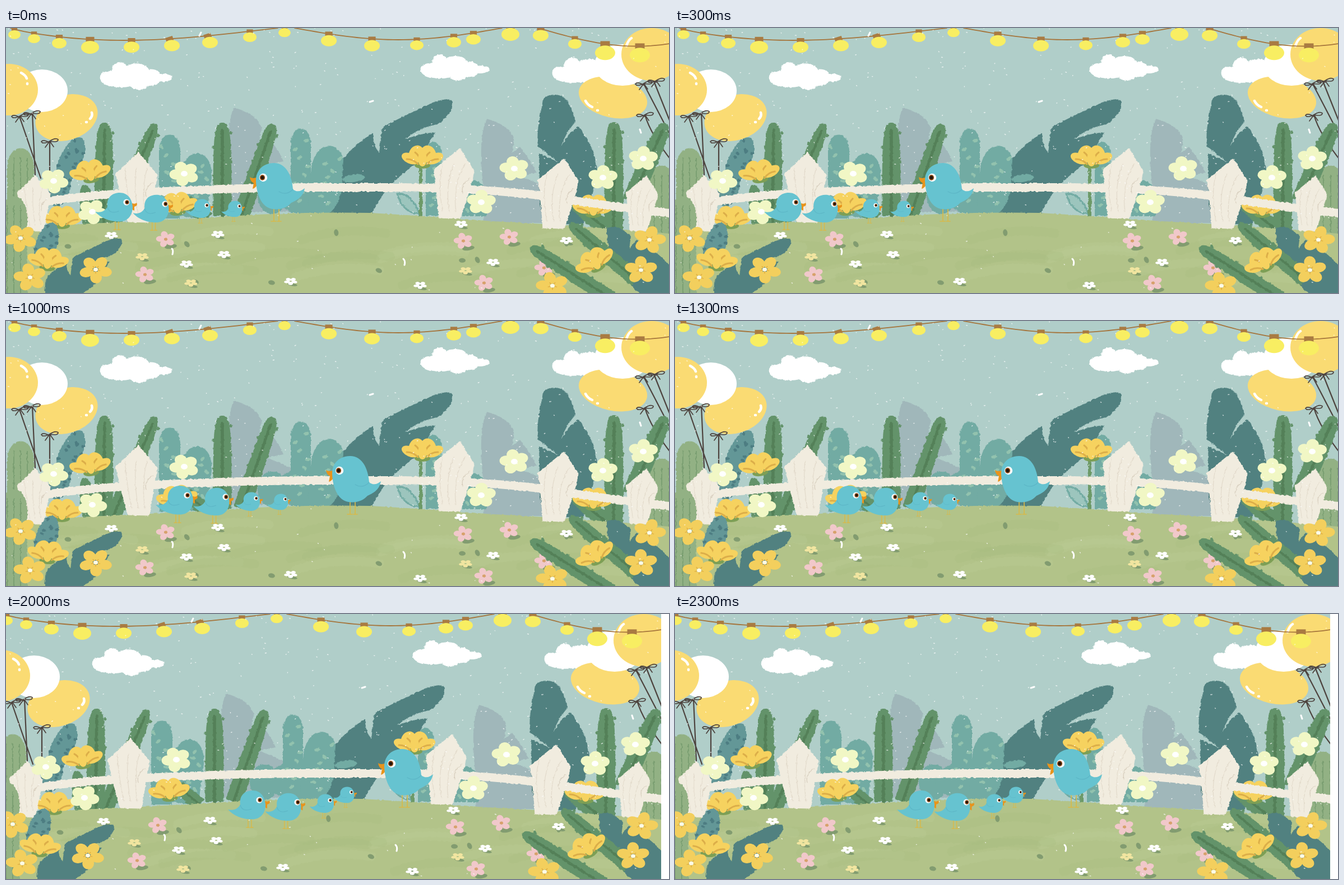
Write an HTML page that moves like this. It is 1183 px wide and 473 px high and loops after 2.5 s.

```html
<!DOCTYPE html>
<html lang="en">
<head>
<meta charset="utf-8">
<title>Birds in the garden</title>
<style>
html, body { margin: 0; width: 100%; height: 100%; overflow: hidden; background: #fff; }
body > svg { display: block; width: 100vw; height: 100vh; }
</style>
</head>
<body>
<script>
const W = 1183, H = 473;
let seed = 7;
const rand = (lo = 0, hi = 1) => lo + (hi - lo) * (seed = (seed * 16807) % 2147483647) / 2147483647;

const path = (d, fill, extra = '') => `<path d="${d}" fill="${fill}" ${extra}/>`;
const line = (d, color, w, extra = '') =>
  `<path d="${d}" fill="none" stroke="${color}" stroke-width="${w}" stroke-linecap="round" ${extra}/>`;
const oval = (x, y, rx, ry, fill, rot = 0) =>
  `<ellipse cx="${x}" cy="${y}" rx="${rx}" ry="${ry}" fill="${fill}" transform="rotate(${rot} ${x} ${y})"/>`;
const move = (s, transform) => `<g transform="${transform}">${s}</g>`;
const rough = s => `<g filter="url(#rough)">${s}</g>`;
const repeat = (n, fn) => Array.from({ length: n }, (_, i) => fn(i)).join('');
const each = (list, fn) => list.map(a => fn(...a)).join('');

// ---------- plants ----------
const GREEN = '#63936a', DARK = '#518180', TEAL = '#72aba3', GREY = '#a0b7ba', PALE = '#92b184';

// Tapered leaf from its tip to its foot
function stalk(x1, y1, x2, y2, w) {
  const len = Math.hypot(x2 - x1, y2 - y1), h = w / 2;
  const s = path(`M0 0C0 ${-h} 30 ${-h} ${len} ${-h}V${h}C30 ${h} 0 ${h} 0 0Z`, GREEN) +
    line(`M14 0H${len}`, '#548058', w / 6) +
    repeat(Math.floor(len / 26), i => oval(18 + i * 26, (i % 2 ? h : -h) * .92, 3, 2.5, GREEN));
  return move(s, `translate(${x1} ${y1}) rotate(${Math.atan2(y2 - y1, x2 - x1) * 180 / Math.PI})`);
}

function cactus(x, top, bottom, rx, color, rot = 0) {
  const dome = `M${x - rx} ${bottom}V${top + rx * 1.6}C${x - rx} ${top - rx * .5} ${x + rx} ${top - rx * .5} ${x + rx} ${top + rx * 1.6}V${bottom}Z`;
  const marks = color === PALE
    ? repeat(3, i => line(`M${x + (i - 1) * rx / 2} ${top + 18}V${bottom}`, '#7b9f72', 2))
    : repeat(8, i => oval(x + rand(-.8, .8) * rx, top + 22 + i * (bottom - top - 28) / 8, 5, 2.8, '#92c2ae', rand(-60, 60)));
  return move(path(dome, color) + marks, `rotate(${rot} ${x} ${bottom})`);
}

const spotted = (x, y, rx, ry, rot) => move(
  oval(0, 0, rx, ry, '#639797') + repeat(14, i => {
    const a = i * 2.4, k = i % 2 ? .9 : .5;
    return oval(Math.cos(a) * rx * k, Math.sin(a) * ry * k, 3.5, 2.5, '#4d7d82', a * 57);
  }), `translate(${x} ${y}) rotate(${rot})`);

const greyLeaf = path('M406 142C430 148 450 160 456 178L452 203 466 192C480 210 490 225 495 238L466 244 508 262V328H400C408 270 385 200 406 142Z', GREY);
const bigLeaf = path('M797 134C797 120 765 130 742 142C715 156 692 165 671 178L666 222Q655 212 655 187C635 200 614 216 602 234L600 268Q600 310 578 330H654C672 290 700 264 735 240L766 186Q738 188 712 199Q735 178 769 172C785 163 797 148 797 134Z', DARK);
const tallLeaf = path('M958 128C970 114 992 118 1000 128C1010 145 1018 160 1014 170Q1000 185 990 212Q1004 186 1022 176C1040 200 1058 235 1055 268L1030 350H960C945 290 953 260 951 224L985 239 949 211C946 180 955 150 958 128Z', DARK);

const backPlants = greyLeaf + move(greyLeaf, 'translate(451 20)') + tallLeaf +
  cactus(26, 214, 375, 24, PALE) + cactus(1170, 245, 370, 26, PALE) +
  spotted(115, 238, 20, 46, 24) + spotted(97, 285, 17, 35, 15) +
  stalk(267, 171, 190, 352, 27) + stalk(176, 169, 174, 352, 33) + stalk(140, 280, 150, 352, 26) +
  cactus(292, 190, 340, 19, TEAL) + cactus(328, 222, 338, 29, TEAL, 8) +
  stalk(310, 300, 360, 340, 24) + stalk(386, 169, 386, 335, 33) + stalk(477, 171, 420, 335, 29) +
  oval(475, 300, 26, 32, TEAL) + oval(540, 298, 62, 34, TEAL) +
  cactus(526, 179, 330, 18, TEAL) + cactus(568, 209, 330, 30, TEAL, 5) + cactus(763, 203, 335, 14, TEAL) +
  path('M698 296Q722 292 738 332Q708 330 698 296Z', '#9cc5bd', `stroke="${TEAL}" stroke-width="3"`) +
  bigLeaf + oval(620, 268, 20, 7, TEAL, -8) + line('M740 245V334', '#6d9a68', 6) +
  stalk(1177, 170, 1115, 310, 32) + stalk(1085, 168, 1084, 362, 34) + stalk(1010, 310, 1070, 358, 28) +
  cactus(836, 272, 336, 22, TEAL);

const frontPlants = cactus(14, 300, H + 10, 24, PALE) +
  move(bigLeaf, 'translate(-351 286) scale(.7)') + spotted(72, 386, 19, 40, 18) +
  path('M1072 358C1085 350 1105 360 1115 372L1112 394 1125 378C1150 390 1193 425 1193 440V483H1140C1100 450 1070 400 1072 358Z', DARK) +
  stalk(1006, 349, 1125, 450, 27) + stalk(936, 391, 1080, 483, 27);

// ---------- flowers ----------
const bloom = (x, y, r, color, rot, core, fat = .36, flat = .84) => move(
  repeat(5, i => `<ellipse cx="${r * .58}" rx="${r * .44}" ry="${r * fat}" fill="${color}" transform="rotate(${i * 72 + rot})"/>`) + core,
  `translate(${x} ${y}) scale(1 ${flat})`);

const rays = repeat(5, i => line('M0 0H8', '#e2ae43', 1.6, `transform="rotate(${i * 72 + 18})"`));
const yellow = (x, y) => bloom(x, y, 29, '#f3cf5d', x % 72, rays + oval(0, 0, 4, 4, '#fffbe6'));
const cream = (x, y) => bloom(x, y, 26, '#f1f7c5', x % 72, oval(0, 0, 6, 6, '#fff'), .42);

function cup(x, y, rot = 0) {
  const side = oval(-22, 3, 16, 9, '#f6d25f', 24) + oval(-11, -5, 13, 16, '#f6d25f', 24) +
    line('M-28 4Q-16 4-8 13M-13-8Q-6-3-4 7', '#dcae49', 3);
  return move(oval(0, 15, 14, 6, '#7d9f55') + side + move(side, 'scale(-1 1)') + oval(0, 4, 8, 13, '#f6d25f'),
    `translate(${x} ${y}) rotate(${rot})`);
}

const LEAF = '#829c70';
const pink = (x, y) => oval(x + 9, y + 13, 11, 4, LEAF, -8) + line(`M${x} ${y}l3 14`, LEAF, 2) +
  bloom(x, y, 17, '#f1c8ca', 40, oval(0, 0, 3, 3, '#d9a06b'));
const small = color => (x, y) => oval(x + 3, y + 6, 9, 2.5, LEAF, 10) + bloom(x, y, 12, color, 20, '', .36, .55);

const meadow = repeat(14, () => oval(rand(100, 1100), rand(365, 465), 6, 4, LEAF, rand(0, 90))) +
  each([[285, 377], [248, 440], [816, 380], [898, 373], [853, 455], [960, 428]], pink) +
  each([[188, 370], [378, 368], [322, 421], [508, 452], [389, 404], [812, 350], [1000, 379], [869, 418], [739, 459]], small('#fff')) +
  each([[243, 408], [330, 455], [820, 433]], small('#f1e5a0'));

// ---------- fence ----------
// lean: 0 for an upright post, 1 for one whose foot slants to the left
function post(x, y, size, lean) {
  const left = -40 - 7 * lean, right = 34 - 9 * lean, foot = -19 - 19 * lean;
  const s = path(`M0 0L${right} 40Q${right - 3} 62 ${foot + 38} 125L${foot} 124Q${left + 5} 62 ${left} 38Z`,
    '#f1ecdf', 'stroke="#f1ecdf" stroke-linejoin="round"') +
    repeat(3, i => line(`M${left + 16 + i * 20} 28Q${foot + i * 13 - 2} 65 ${foot + 7 + i * 12} 112`, '#e2dacb', 1.2)) +
    line(`M${right - 8} 54q-16 10-12 25`, '#d8cfbf', 1.3);
  return move(s, `translate(${x} ${y}) scale(${size})`);
}

const fence = line('M-8 324Q90 303 200 296Q400 285 550 284.5H700Q850 286 955 299Q1060 316 1195 332', '#f1ecdf', 15) +
  each([[52, 263, .8, 0], [236, 222, 1, 0], [810, 215, 1, 1], [996, 233, 1, 1], [1143, 264, .79, 1]], post);

// ---------- sky ----------
const cloud = path('M2 36C-4 22 12 18 22 19C20 4 40-4 49 10C60 2 82 4 88 16C98 14 108 20 107 24C120 22 134 27 129 32C124 38 112 39 107 38C104 46 90 44 86 46C78 54 62 54 55 46C40 50 8 48 2 36Z', '#fff');
const clouds = each([[167, 58, 1, 1], [739, 45, .96, .94], [974, 50, 1, 1]],
  (x, y, sx, sy) => move(cloud, `translate(${x} ${y}) scale(${sx} ${sy})`));

const CORD = '#4d433e', GOLD = '#fadb73';
const bow = (x, y) => line(`M${x} ${y}q-12-7-15-2 3 5 15-1 10-7 15-3 0 6-15 3l-8 11m8-11l7 10`, CORD, 1.7);
const balloons = line('M24 158L62 268M47 152L52 262M78 204V266M1138 100L1190 200M1156 95L1190 180M1140 155Q1150 190 1190 240', CORD, 2.2) +
  oval(108, 160, 57, 40, GOLD, -18) + oval(64, 112, 46, 38, '#fff') + oval(5, 110, 52, 46, GOLD) +
  oval(1083, 124, 62, 36, GOLD, 12) + oval(1100, 66, 50, 37, '#fff') + oval(1152, 47, 54, 47, GOLD) +
  line('M27 80Q35 84 37 90M153 151Q155 157 150 162M1034 130Q1038 138 1046 141M1107 32Q1110 22 1116 18M38 99v1M143 168h1M1055 147h1', '#fff', 4.5) +
  each([[25, 160], [46, 155], [78, 205], [1138, 102], [1160, 97], [1140, 158]], bow);

// Garlands: start, end, depth and skew of each hanging cord
const cords = [[8, 485, 22, .81], [515, 885, 21, 1], [950, 1300, 32.5, 1]];
const sag = x => {
  const [a, b, depth, skew] = cords.find(c => x < c[1] + 20);
  return depth * Math.sin(Math.PI * Math.max(0, (x - a) / (b - a)) ** skew);
};
const cordLines = each(cords, (a, b) =>
  line('M' + Array.from({ length: 41 }, (_, i) => a + (b - a) * i / 40).map(x => `${x} ${sag(x)}`).join('L'), '#a5753c', 1.8));

function bulb(x, r) {
  const y = sag(x), tilt = x > 280 && x < 380 ? -18 : 0;
  return `<rect x="${x - r * .47}" y="${y - r * .28}" width="${r * .94}" height="${r * .7}" fill="#a97b42" transform="rotate(${tilt} ${x} ${y + r})"/>` +
    oval(x, y + r * .88, r, r * .72, '#f8ee62');
}
const lights = cordLines + each([[15, 11], [50, 11], [95, 13], [150, 16], [224, 14], [296, 14], [364, 14], [435, 12], [497, 11],
  [576, 14], [653, 14], [733, 12], [799, 13], [834, 13], [900, 16], [954, 14], [1015, 12], [1069, 18], [1131, 18]], bulb);

const dots = (n, bottom) => repeat(n, () => `M${rand(0, W)} ${rand(0, bottom)}l${rand(-1, 2)} ${rand(-1, 1)}`);
const specks = line(dots(330, 340) + dots(80, H), '#fff', 1.4, 'opacity=".75"') +
  line('M649 132l6-2M296 394q3 2 1 10M709 412q4 4 2 11M1131 181l2 6M348 8l-3 6', '#fff', 3);

// ---------- ground ----------
const ground = path('M-10 363Q100 350 217 346Q340 340 430 334Q540 328 650 330Q770 337 870 345Q1050 354 1193 368V483H-10Z', '#b2c389') +
  repeat(22, i => line(`M${rand(0, 1100)} ${rand(375, 465)}q70-24 150-12`, i % 2 ? '#a6b97e' : '#bccb96', 16, 'opacity=".28"'));

const scene = `<rect width="${W}" height="${H}" fill="#b0cec9"/>` +
  rough(clouds) + balloons + lights + rough(backPlants + ground) +
  cup(1048, 318) + cup(100, 338) + rough(fence) + meadow + rough(frontPlants) +
  each([[150, 256, -8], [305, 314, -6], [743, 230, 0], [75, 413, 6], [1050, 415, -28]], cup) +
  each([[85, 273], [154, 328], [318, 260], [907, 251], [848, 311], [1065, 267], [1137, 233]], cream) +
  each([[26, 375], [43, 445], [160, 431], [1148, 378], [1133, 432], [975, 460]], yellow) + specks;

// ---------- birds ----------
const BLUE = '#66c3d0', FOLD = '#5db6c6', ORANGE = '#e8941c', LEG = '#d9b948';
const eye = (x, r, look) => oval(x, 0, r, r, '#fff') +
  oval(x + look, 0, r * .64, r * .68, '#8a4a17') + oval(x + look, 0, r * .4, r * .42, '#23150d');

const mother = move(line('M19 55V77M28 55V77M14 78H23M25 78H32', LEG, 1.6) +
  path('M-10-1Q-19 3-24-1Q-23 7-17 10L-19 20Q-12 18-9 9Z', ORANGE) +
  path('M-13 7C-14-13 0-26 19-26C40-26 51-5 53 21C61 27 68 24 74 19C71 36 58 41 50 45C41 55 27 59 12 55C-4 50-12 28-13 7Z', BLUE) +
  line('M28 25Q41 33 53 21', FOLD, 1.2) + eye(0, 7.2, -1.5), 'translate(459 267)');

const chick = (x, y, size, eyeX) => move(line('M-20 33V48M-14 33V48M-23 49H-18M-16 49H-11', LEG, 1.4) +
  path('M7 0Q14 5 18 1Q21 6 14 8L14 15Q8 13 7 7Z', ORANGE) +
  path('M-34 8C-36-8-26-17-12-17C2-17 10-6 11 8C11 24 2 34-12 34.5C-30 35-46 28-56 17C-47 19-39 17-34 8Z', BLUE) +
  line('M-34 9Q-30 22-14 16', FOLD, 1.1) + eye(eyeX, 5.6, 1), `translate(${x} ${y}) scale(${size})`);

// Even strides at first, then two longer hops to the places in "late"
const birds = [
  { art: mother, stride: 68, late: [[229, 0], [229, 0]] },
  { art: chick(215, 311, 1, 0), stride: 54, late: [[192, -9], [237, 21]] },
  { art: chick(280, 314, .96, 4), stride: 54, late: [[196, -1], [236, 22]] },
  { art: chick(358, 316.5, .65, 0), stride: 44, late: [[174, -1], [220, 16]] },
  { art: chick(415.5, 318, .56, 1), stride: 41, late: [[159, 0], [200, 0]] }
];

document.body.insertAdjacentHTML('beforeend', `<svg viewBox="0 0 ${W} ${H}">
  <filter id="rough" filterUnits="userSpaceOnUse" x="-10" y="-10" width="${W + 20}" height="${H + 20}" color-interpolation-filters="sRGB">
    <feTurbulence type="fractalNoise" baseFrequency=".2" numOctaves="2" seed="3"/>
    <feDisplacementMap in="SourceGraphic" scale="4" xChannelSelector="R" yChannelSelector="G"/>
  </filter>
  <svg id="scene" width="${W}" height="${H}">${scene}</svg>
  ${birds.map(b => `<g class="bird">${b.art}</g>`).join('')}
</svg>`);

const backdrop = document.getElementById('scene');
const nodes = document.querySelectorAll('.bird');
const start = performance.now();
let shown = -1;

function draw(now) {
  const step = Math.floor(Math.max(0, now - start) / 500) % 5;
  if (step !== shown) {
    shown = step;
    backdrop.setAttribute('x', step === 4 ? -14 : 0);
    birds.forEach(({ stride, late }, i) => {
      const [x, y] = step < 3 ? [stride * step, 0] : late[step - 3];
      nodes[i].setAttribute('transform', `translate(${x} ${y})`);
    });
  }
  requestAnimationFrame(draw);
}
draw(start);
</script>
</body>
</html>
```
